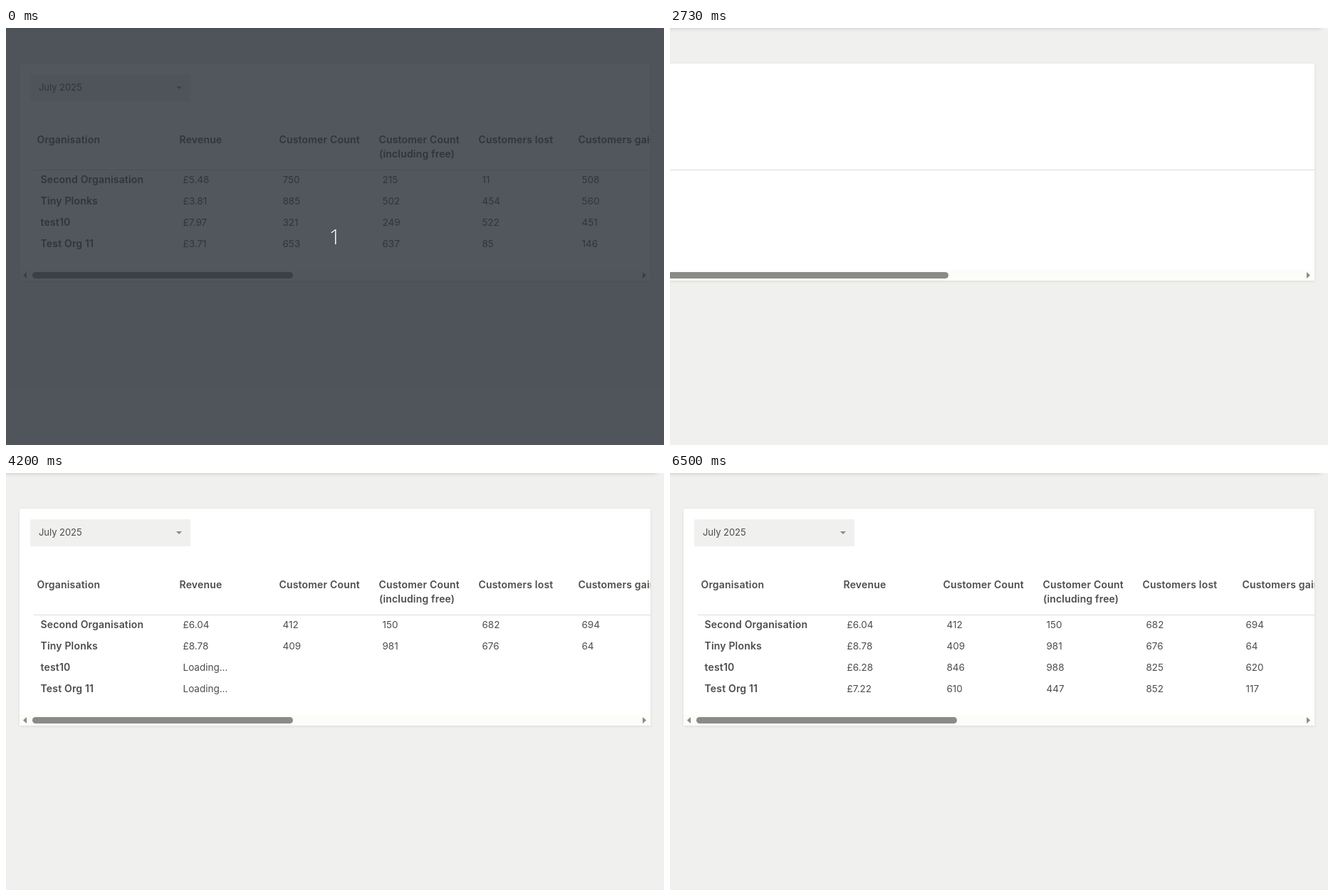
Recreate the animation shown at these times as an HTML page. Size 924 by 586 pixels, loop 8100 ms.

```html
<!DOCTYPE html>
<html lang="en">
<head>
<meta charset="utf-8">
<title>Organisation report</title>
<style>
  html, body { margin: 0; width: 100%; height: 100%; overflow: hidden; background: #f0f0ef; }
  #stage { position: relative; width: 924px; height: 586px; overflow: hidden; background: #f0f0ef; }
  .nav { position: absolute; left: -20px; top: -20px; width: 934px; height: 20px; box-shadow: 0 0 6px rgba(0, 0, 0, .2); }
  .card { position: absolute; left: 19px; top: 50px; width: 886px; height: 305px; background: #fefffe;
    border-radius: 2px; box-shadow: 0 1px 4px rgba(0, 0, 0, .09); }
  .wide .card { left: -20px; width: 925px; }
  svg { position: absolute; left: 0; top: 0; }
  .wide #content { display: none; }
  text { font: 13.5px Inter, "Open Sans", sans-serif; fill: #4d4d4b; white-space: pre; }
  .bold { font-weight: 600; font-size: 14px; letter-spacing: .18px; }
  .month { font-size: 13px; letter-spacing: -.05px; }
  .count { font: 300 30px "Open Sans", "Noto Sans", sans-serif; fill: #fff; text-anchor: middle; }
  .bar { fill: #8a8a86; }
</style>
</head>
<body>
<div id="stage">
  <div class="nav"></div>
  <div class="card"></div>
  <svg width="924" height="586" viewBox="0 0 924 586">
    <clipPath id="clip"><rect width="905" height="586"/></clipPath>
    <rect id="track" y="340" height="15" fill="#fcfdf9"/>
    <rect id="rule" y="199" height="1" fill="#dcdcdb"/>
    <rect id="thumb" class="bar" y="343" height="9" rx="4.5"/>
    <path class="bar" d="M894 343l5 4.5l-5 4.5z"/>
    <g id="content" clip-path="url(#clip)">
      <path class="bar" d="M29 343l-5 4.5l5 4.5z"/>
      <rect x="34" y="65" width="225" height="38" rx="2" fill="#f0f0ef"/>
      <path d="M239 82h8l-4 4z" fill="#8a8a88"/>
    </g>
    <g id="intro">
      <rect width="924" height="586" fill="rgb(42,47,56)" fill-opacity=".81"/>
      <text class="count" x="462" y="304">1</text>
    </g>
  </svg>
</div>
<script>
const LOOP = 8100, INTRO_END = 930, BLANK = 2730, RELOAD = 2770;
const columns = [44, 244, 384, 524, 664, 804];
const headers = ["Organisation", "Revenue", "Customer Count", "Customer Count", "Customers lost", "Customers gained"];
const rows = [
  { name: "Second Organisation", before: "£5.48 750 215 11 508", after: "£6.04 412 150 682 694", ready: 3070 },
  { name: "Tiny Plonks", before: "£3.81 885 502 454 560", after: "£8.78 409 981 676 64", ready: 4200 },
  { name: "test10", before: "£7.97 321 249 522 451", after: "£6.28 846 988 825 620", ready: 5370 },
  { name: "Test Org 11", before: "£3.71 653 637 85 146", after: "£7.22 610 447 852 117", ready: 6500 }
];

const el = id => document.getElementById(id);
const stage = el("stage"), content = el("content"), intro = el("intro");

function addText(x, y, value, className = "") {
  const node = document.createElementNS("http://www.w3.org/2000/svg", "text");
  node.setAttribute("x", x);
  node.setAttribute("y", y);
  node.setAttribute("class", className);
  node.textContent = value;
  content.append(node);
  return node;
}

function span(id, left, right) {
  el(id).setAttribute("x", left);
  el(id).setAttribute("width", right - left);
}

addText(46, 88, "July 2025", "month");
headers.forEach((label, i) => addText(columns[i] - .5, 162, label, "bold"));
addText(524, 182, "(including free)", "bold");
rows.forEach((row, i) => {
  const y = 218 + i * 30;
  addText(48.5, y, row.name, "bold");
  row.cells = columns.slice(1).map(x => addText(x + 4.5, y, ""));
});

function rowText(row, t) {
  if (t < BLANK) return row.before;
  return t < row.ready ? "Loading..." : row.after;
}

function render(t) {
  const blank = t >= BLANK && t < RELOAD;
  intro.style.display = t < INTRO_END ? "" : "none";
  stage.classList.toggle("wide", blank);
  span("track", blank ? -20 : 19, 905);
  span("rule", blank ? -20 : 39, 905);
  span("thumb", blank ? -20 : 37, blank ? 391 : 403);
  for (const row of rows) {
    const values = rowText(row, t).split(" ");
    row.cells.forEach((cell, i) => { cell.textContent = values[i] || ""; });
  }
}

const start = performance.now();
function tick() {
  render((performance.now() - start) % LOOP);
  requestAnimationFrame(tick);
}
tick();
</script>
</body>
</html>
```
